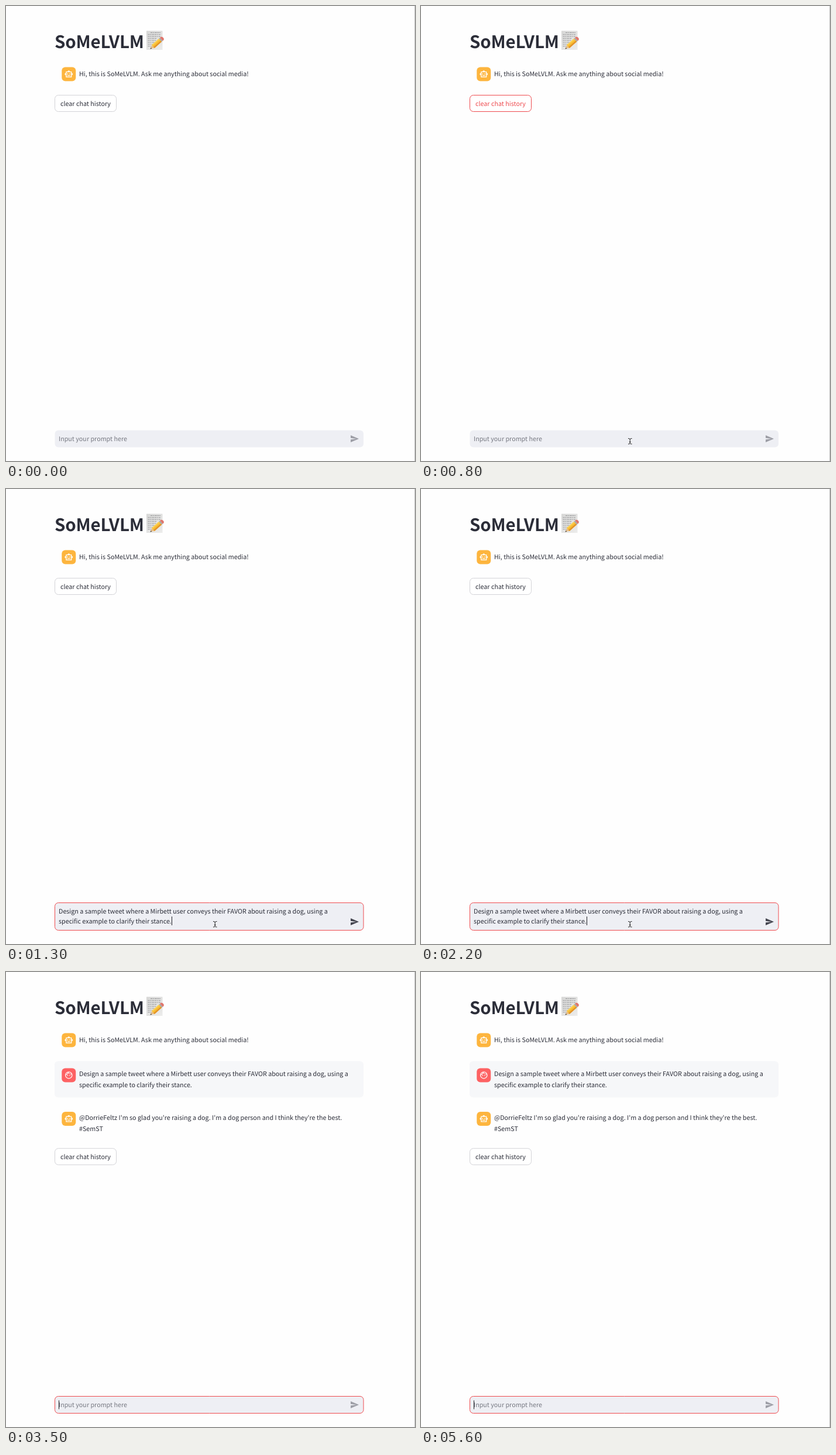
An HTML page with a canvas for the animation above (5.7 s loop, 699 by 778 pixels).

```html
<!DOCTYPE html>
<html lang="en">
<head>
<meta charset="utf-8">
<title>Chat demo</title>
<style>
  html, body { margin: 0; width: 100%; height: 100%; overflow: hidden; background: #fefefe; }
  canvas { display: block; width: 699px; height: 778px; }
</style>
</head>
<body>
<canvas id="stage"></canvas>
<script>
const W = 699, H = 778, LOOP = 5700;
const FAMILY = '"Noto Sans CJK JP", "Noto Sans CJK SC", "Noto Sans CJK", "Open Sans", sans-serif';
const BODY = `10.74px ${FAMILY}`;
const TITLE = `bold 29.5px ${FAMILY}`;
const INK = '#2b2d38', RED = '#ee4a4e', ORANGE = '#fdb53e', ROSE = '#fd6263';
const PROMPT = [
  'Design a sample tweet where a Mirbett user conveys their FAVOR about raising a dog, using a',
  'specific example to clarify their stance.'
];
const REPLY = [
  "@DorrieFeltz I'm so glad you're raising a dog. I'm a dog person and I think they're the best.",
  '#SemST'
];

// Moments of the story, in ms
const PRESS = 200, POINTER = 500, FOCUS = 900, PASTE = 1000, SEND = 2300, ANSWER = 3200;
const CARET_OFF = [[1700, 2000], [2500, 2700], [3000, 3200], [3700, 4000], [4400, 4700], [5000, 5300]];

const canvas = document.getElementById('stage');
const ctx = canvas.getContext('2d');
const dpr = window.devicePixelRatio || 1;
canvas.width = W * dpr;
canvas.height = H * dpr;

function text(str, x, y, color = INK, font = BODY, spacing = '0px') {
  ctx.font = font;
  ctx.letterSpacing = spacing;
  ctx.fillStyle = color;
  ctx.fillText(str, x, y);
}

function box(x, y, w, h, r, fill, stroke) {
  ctx.beginPath();
  ctx.roundRect(x, y, w, h, r);
  if (fill) { ctx.fillStyle = fill; ctx.fill(); }
  if (stroke) { ctx.strokeStyle = stroke; ctx.lineWidth = 1; ctx.stroke(); }
}

function dot(x, y, r) {
  ctx.beginPath();
  ctx.arc(x, y, r, 0, Math.PI * 2);
  ctx.fill();
}

function line(path, color, width) {
  ctx.strokeStyle = color;
  ctx.lineWidth = width;
  ctx.stroke(new Path2D(path));
}

// Runs draw in a moved and scaled coordinate system
function place(x, y, scale, draw) {
  ctx.save();
  ctx.translate(x, y);
  ctx.scale(scale, scale);
  draw();
  ctx.restore();
}

function robot() {
  line('M5 6H19V20H5Z M10 6V5A2 2 0 0 1 14 5V6 M5 10H4A2 2 0 0 0 4 14H5 M19 10H20A2 2 0 0 1 20 14H19 M8 16H16', '#fff', 2);
  dot(9, 11.5, 1.5);
  dot(15, 11.5, 1.5);
}

function face() {
  line('M12 3A9 9 0 0 1 12 21A9 9 0 0 1 12 3Z', '#fff', 2);
  line('M4 11.5Q9 9.5 10.3 5Q14 10 20 9.3', '#fff', 1.8);
  dot(9, 13.2, 1.3);
  dot(15, 13.2, 1.3);
}

function avatar(y, color, icon) {
  box(95.3, y, 24, 24, 6, color);
  place(99.8, y + 4.5, 0.625, () => {
    ctx.fillStyle = '#fff';
    icon();
  });
}

function memo() {
  const paper = ctx.createLinearGradient(240, 42, 267, 75);
  paper.addColorStop(0, '#d6d6d5');
  paper.addColorStop(1, '#ececeb');
  box(240, 42.5, 27.5, 32.5, 0.5, paper);
  ctx.save();
  ctx.setLineDash([3, 0.8, 2, 1, 4, 0.7]);
  for (let i = 0; i < 8; i++) {
    const y = 45.5 + i * 3.3;
    line(`M${i ? 242.5 : 247} ${y}H${i < 3 ? 264 : 263 - i * 1.7}`, '#8f9092', 0.9);
  }
  ctx.restore();
  ctx.save();
  ctx.translate(246.5, 73.5);
  ctx.rotate(-0.72);
  const part = (path, color) => { ctx.fillStyle = color; ctx.fill(new Path2D(path)); };
  part('M0 0L7 -3.6V3.6Z', '#e6c08c');
  part('M0 0L2.4 -1.2V1.2Z', '#3b3636');
  part('M6.5 -3.6H23V3.6H6.5Z', '#f8bd33');
  part('M6.5 1.2H23V3.6H6.5Z', '#e3932a');
  part('M6.5 -3.6H23V-1.6H6.5Z', '#fbd155');
  part('M23 -3.6H25.3V3.6H23Z', '#a9a9a6');
  part('M25.3 -3.6H27Q29.4 -3.4 29.4 0Q29.4 3.4 27 3.6H25.3Z', '#e0756c');
  ctx.restore();
}

function button(y, color, border) {
  box(83.5, y, 105, 28, 6, '#fff', border);
  text('clear chat history', 93, y + 18, color);
}

function message(lines, y) {
  lines.forEach((str, i) => text(str, 125, y + i * 19.2));
}

function sendIcon(color) {
  place(587.7, 732, 0.667, () => {
    ctx.fillStyle = color;
    ctx.fill(new Path2D('M2 21L23 12L2 3V10L17 12L2 14Z'));
  });
}

function caret(x, y) {
  ctx.fillStyle = '#1f2026';
  ctx.fillRect(x, y, 1, 15);
}

function inputBar(t) {
  const focused = t >= FOCUS, filled = t >= PASTE && t < SEND;
  const top = filled ? 707.5 : 725.5;
  const blinkOn = focused && !CARET_OFF.some(([from, to]) => t >= from && t < to);
  box(83.5, top, 527.5, 754.5 - top, 6, '#eeeff4', focused ? RED : null);
  sendIcon(filled ? '#44454f' : '#9d9ea6');
  if (filled) {
    PROMPT.forEach((str, i) => text(str, 90, 726.2 + i * 16.8));
    if (blinkOn) caret(Math.round(90 + ctx.measureText(PROMPT[1]).width), 731);
  } else {
    text('Input your prompt here', 90, 744.4, '#777982');
    if (blinkOn) caret(90, 732.5);
  }
}

function pointer() {
  line('M354 739.5Q357 739.3 357.2 741V747.5Q357 749.2 354 749M360.5 739.5Q357.4 739.3 357.2 741M357.2 747.5Q357.4 749.2 360.5 749M355.8 745.5H358.6', '#222', 1);
}

function draw(t) {
  ctx.setTransform(dpr, 0, 0, dpr, 0, 0);
  ctx.textRendering = 'geometricPrecision';
  ctx.fillStyle = '#fefefe';
  ctx.fillRect(0, 0, W, H);
  ctx.fillStyle = '#c6c6c6';
  ctx.fillRect(698, 0, 1, H);

  text('SoMeLVLM', 83, 72, INK, TITLE, '-0.16px');
  memo();
  avatar(104.4, ORANGE, robot);
  message(['Hi, this is SoMeLVLM. Ask me anything about social media!'], 120.2);

  if (t < SEND) {
    const pressed = t >= PRESS && t < FOCUS;
    button(152.5, pressed ? RED : INK, pressed ? RED : '#d3d3d7');
  } else {
    box(83, 152.5, 528, 62, 6, '#f6f7f9');
    avatar(164.4, ROSE, face);
    message(PROMPT, 178.1);
  }
  if (t >= ANSWER) {
    avatar(238.9, ORANGE, robot);
    message(REPLY, 252.5);
    button(301.7, INK, '#d3d3d7');
  }

  inputBar(t);
  if (t >= POINTER && t < SEND) pointer();
}

const start = performance.now();
function tick() {
  draw((performance.now() - start) % LOOP);
  requestAnimationFrame(tick);
}
tick();
</script>
</body>
</html>
```
